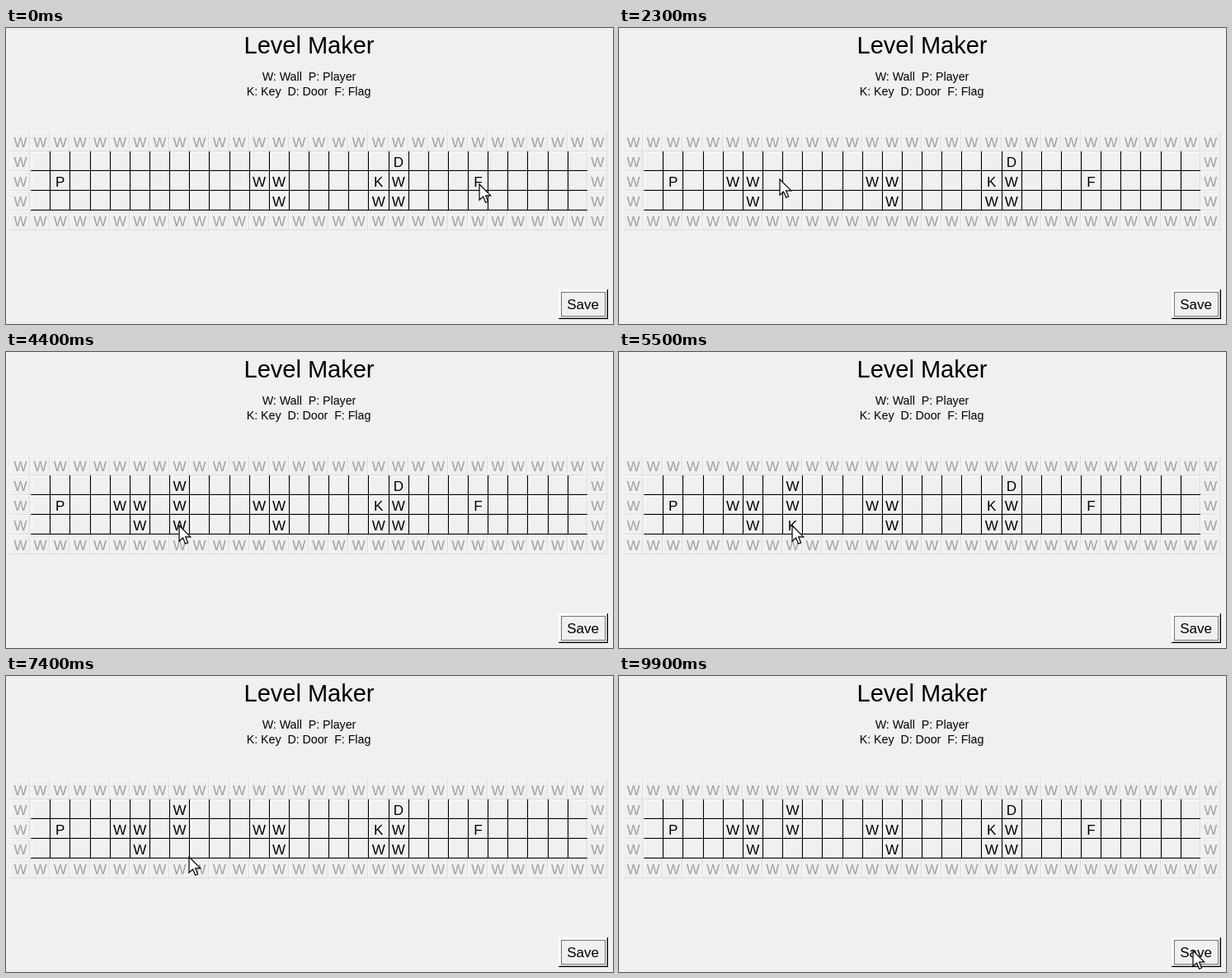
Animation, 736 px wide and 360 px high, one loop 10000 ms. Source, as an HTML page with a canvas:

```html
<!DOCTYPE html>
<html lang="en">
<head>
<meta charset="utf-8">
<title>Level Maker</title>
<style>
  html, body { margin: 0; width: 736px; height: 360px; overflow: hidden; background: #f0f0f0; }
  canvas { display: block; }
</style>
</head>
<body>
<canvas id="stage" width="736" height="360"></canvas>
<script>
const ctx = document.getElementById('stage').getContext('2d');
const LOOP = 10000, STEP = 100, COLS = 30, ROWS = 5;
const left = c => Math.floor(5.6 + 24.13 * c);
const top_ = r => 126 + 24 * r;

// column, row, letter
const start = [[2, 2, 'P'], [12, 2, 'W'], [13, 2, 'W'], [13, 3, 'W'], [18, 2, 'K'],
  [18, 3, 'W'], [19, 1, 'D'], [19, 2, 'W'], [19, 3, 'W'], [23, 2, 'F']];

// release time, column, row, new letter
const clicks = [[1100, 6, 3, 'W'], [1500, 6, 2, 'W'], [1900, 5, 2, 'W'],
  [2800, 8, 1, 'W'], [3300, 8, 2, 'W'], [4100, 8, 3, 'W'], [4700, 8, 3, 'P'],
  [5300, 8, 3, 'K'], [5900, 8, 3, 'D'], [6400, 8, 3, 'F'], [6900, 8, 3, '']];

// time, x, y of the pointer tip
const path = [[0, 574, 190], [100, 574, 190], [800, 162, 205], [1100, 162, 205],
  [1300, 160, 185], [1500, 160, 185], [1700, 138, 185], [1900, 138, 185],
  [2300, 195, 184], [2600, 210, 160], [2800, 210, 160], [3100, 214, 185],
  [3300, 214, 185], [3800, 210, 211], [6900, 210, 211], [7400, 222, 220],
  [7800, 240, 226], [8700, 696, 334], [LOOP, 696, 334]];

function rect(color, x, y, w, h) {
  ctx.fillStyle = color;
  ctx.fillRect(x, y, w, h);
}

function text(str, x, y, size, color = '#000') {
  ctx.font = `${size}px "Liberation Sans", Arial, sans-serif`;
  ctx.textAlign = 'center';
  ctx.fillStyle = color;
  ctx.fillText(str, x, y);
}

function bevel(x, y, w, h, light, dark) {
  rect(light, x, y, w, 1);
  rect(light, x, y, 1, h);
  rect(dark, x, y + h - 1, w, 1);
  rect(dark, x + w - 1, y, 1, h);
}

function cell(c, r, letter, pressed) {
  const edge = c === 0 || r === 0 || c === COLS - 1 || r === ROWS - 1;
  const x = left(c) + 1, y = top_(r), w = left(c + 1) - left(c);
  if (edge) {
    bevel(x - 1, y, w, 24, '#f8f8f8', '#dddddd');
  } else if (pressed) {
    rect('#f0f0f0', x, y, w, 24);
    bevel(x + 1, y + 2, w - 2, 21, '#000', '#fafafa');
  } else {
    bevel(x + 1, y + 1, w - 2, 22, '#fafafa', '#d8d8d8');
    rect('#000', x, y + 23, w, 1);
    rect('#000', x + w - 1, y, 1, 24);
  }
  const shift = pressed ? 1 : 0;
  text(edge ? 'W' : letter, 17.4 + 24.13 * c + shift, y + 19 + shift, 17, edge ? '#a0a0a0' : '#000');
}

function saveButton() {
  bevel(670, 318, 60, 36, '#fff', '#000');
  bevel(671, 319, 58, 34, '#fff', '#a0a0a0');
  ctx.strokeStyle = '#000';
  ctx.lineWidth = 1;
  ctx.setLineDash([1, 1]);
  ctx.strokeRect(673.5, 321.5, 53, 29);
  ctx.setLineDash([]);
  text('Save', 699.5, 342, 17);
}

function pointer(t) {
  const i = path.findIndex(p => p[0] > t);
  const [t0, x0, y0] = path[i - 1], [t1, x1, y1] = path[i];
  const u = (t - t0) / (t1 - t0), e = u * u * (3 - 2 * u);
  ctx.save();
  ctx.translate(x0 + (x1 - x0) * e, y0 + (y1 - y0) * e);
  ctx.scale(1.2, 1.2);
  ctx.fillStyle = '#fff';
  ctx.strokeStyle = '#000';
  const arrow = new Path2D('M0 0V16L3.8 12.5L6.3 18.5L8.8 17.5L6.3 11.6H11.4Z');
  ctx.fill(arrow);
  ctx.stroke(arrow);
  ctx.restore();
}

function draw(t) {
  rect('#f0f0f0', 0, 0, 736, 360);
  text('Level Maker', 367.5, 31, 29);
  text('W: Wall\u00a0 P: Player', 367.5, 63.5, 14.2);
  text('K: Key\u00a0 D: Door\u00a0 F: Flag', 367, 81.5, 14.2);

  const letters = {};
  for (const [c, r, s] of start) letters[[c, r]] = s;
  let down = null;
  for (const [time, c, r, s] of clicks) {
    if (t >= time) letters[[c, r]] = s;
    else if (t >= time - 150) down = [c, r];
  }
  for (let r = 0; r < ROWS; r++)
    for (let c = 0; c < COLS; c++)
      cell(c, r, letters[[c, r]] || '', down && down[0] === c && down[1] === r);

  saveButton();
  pointer(t);
}

function frame() {
  draw(Math.floor(performance.now() % LOOP / STEP) * STEP);
  requestAnimationFrame(frame);
}
frame();
</script>
</body>
</html>
```
